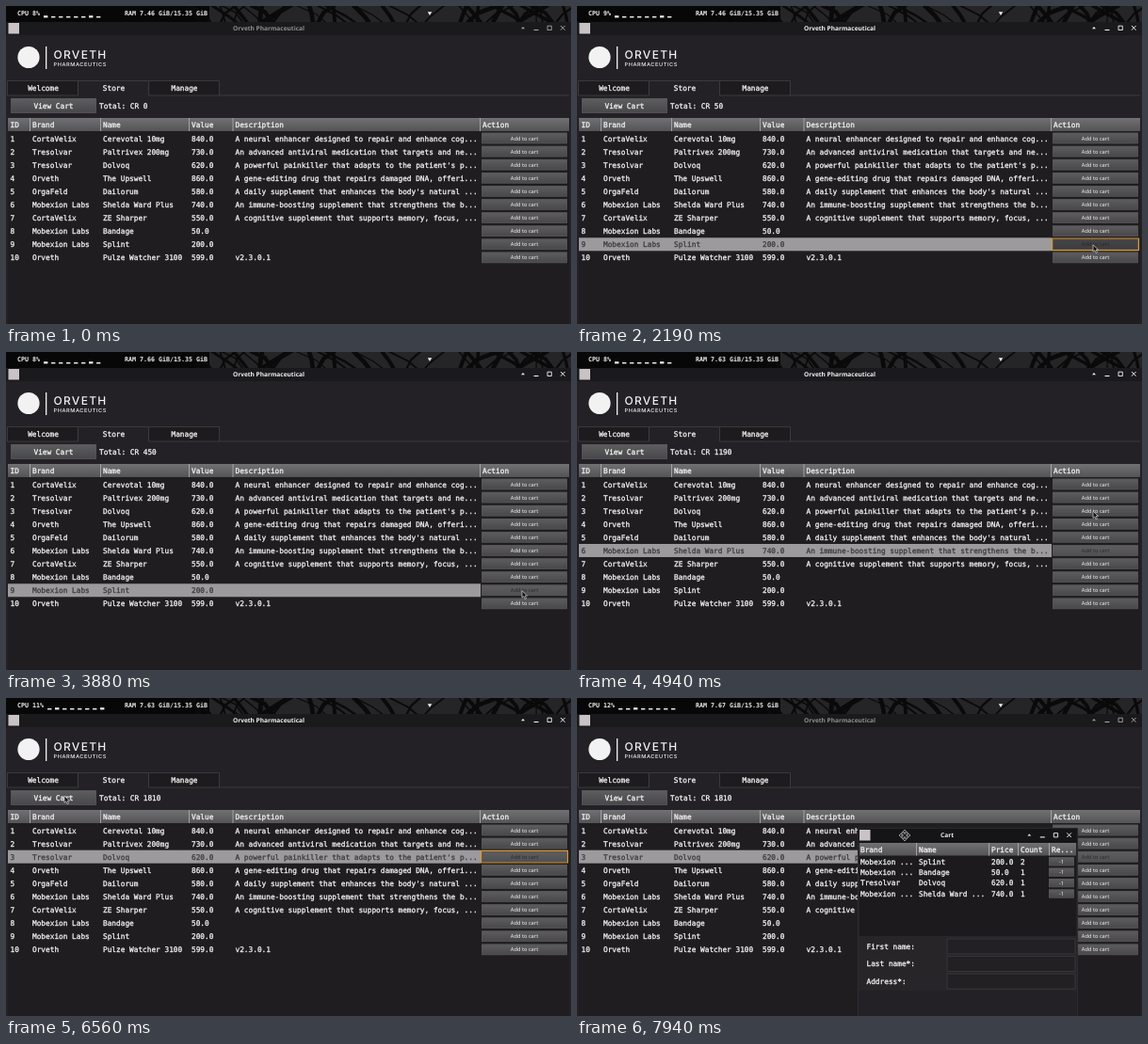
Recreate the animation shown at these times as an HTML page with a canvas. Size 600x338 px, loop 8 s.

```html
<!DOCTYPE html>
<html lang="en">
<head>
<meta charset="utf-8">
<title>Store</title>
<style>
html, body { margin: 0; width: 100%; height: 100%; overflow: hidden; background: #000; }
canvas { display: block; width: 600px; height: 338px; }
</style>
</head>
<body>
<canvas id="stage"></canvas>
<script>
const LOOP = 8000, STEP = 62.5;
const cv = document.getElementById('stage');
const ratio = window.devicePixelRatio || 1;
cv.width = 600 * ratio;
cv.height = 338 * ratio;
const g = cv.getContext('2d');
g.scale(ratio, ratio);
g.textRendering = 'geometricPrecision';
g.lineJoin = 'round';

const MONO = '7.78px "DejaVu Sans Mono", monospace';
const SMALL = '5.7px "Noto Sans", sans-serif';
const BOLD = 'bold 6.55px "Noto Sans", sans-serif';
const STATUS = 'bold 6.65px "DejaVu Sans Mono", monospace';
const BG = '#232125', DARK = '#1f1d20', LIGHT = '#f2f2f2', DIM = '#3d3c3d';

const products = [
  ['CortaVelix', 'Cerevotal 10mg', '840.0', 'A neural enhancer designed to repair and enhance cog...'],
  ['Tresolvar', 'Paltrivex 200mg', '730.0', 'An advanced antiviral medication that targets and ne...'],
  ['Tresolvar', 'Dolvoq', '620.0', "A powerful painkiller that adapts to the patient's p..."],
  ['Orveth', 'The Upswell', '860.0', 'A gene-editing drug that repairs damaged DNA, offeri...'],
  ['OrgaFeld', 'Dailorum', '580.0', "A daily supplement that enhances the body's natural ..."],
  ['Mobexion Labs', 'Shelda Ward Plus', '740.0', 'An immune-boosting supplement that strengthens the b...'],
  ['CortaVelix', 'ZE Sharper', '550.0', 'A cognitive supplement that supports memory, focus, ...'],
  ['Mobexion Labs', 'Bandage', '50.0', ''],
  ['Mobexion Labs', 'Splint', '200.0', ''],
  ['Orveth', 'Pulze Watcher 3100', '599.0', 'v2.3.0.1']
];

const PRESS = 250, GLIDE = 340, OPEN = 6687, GRAB = 7597;
const rowTop = row => 133.5 + (row - 1) * 14.1;
const price = row => +products[row - 1][2];

// ring: how long the button keeps its focus ring
const clicks = [
  { at: 1250, row: 8, ring: 500 },
  { at: 2125, row: 9, ring: 375 },
  { at: 2812, row: 9, ring: 1060 },
  { at: 4500, row: 6, ring: 312 },
  { at: 5125, row: 3, ring: OPEN - 5125 }
];
const moves = [
  ...clicks.map(c => ({ end: c.at - 187, x: 548, y: rowTop(c.row) + 7.5 })),
  { end: 6161, x: 62, y: 104, glide: 536 },
  { end: 6937, x: 277, y: 175 },
  { end: GRAB - 7, x: 384, y: 181 },
  { end: GRAB + GLIDE, x: 348, y: 146 }
];

function rect(x, y, w, h, fill) {
  g.fillStyle = fill;
  g.fillRect(x, y, w, h);
}
function frame(x, y, w, h, color, width = 1) {
  g.strokeStyle = color;
  g.lineWidth = width;
  g.strokeRect(x, y, w, h);
}
function shade(x, y, w, h, top, bottom) {
  const grad = g.createLinearGradient(0, y, 0, y + h);
  grad.addColorStop(0, top);
  grad.addColorStop(1, bottom);
  rect(x, y, w, h, grad);
}
function line(color, width, ...pts) {
  g.strokeStyle = color;
  g.lineWidth = width;
  g.beginPath();
  for (let i = 0; i < pts.length; i += 2) g.lineTo(pts[i], pts[i + 1]);
  g.stroke();
}
function shape(fill, ...pts) {
  g.fillStyle = fill;
  g.beginPath();
  for (let i = 0; i < pts.length; i += 2) g.lineTo(pts[i], pts[i + 1]);
  g.closePath();
  g.fill();
}
// y is the vertical middle of the capitals
function text(s, x, y, font = MONO, color = LIGHT, align = 'left') {
  const base = y + parseFloat(font.match(/[\d.]+px/)[0]) * 0.36;
  g.font = font;
  g.fillStyle = g.strokeStyle = color;
  g.textAlign = align;
  g.fillText(s, x, base);
  if (font === MONO) {
    // medium weight
    g.lineWidth = 0.3;
    g.strokeText(s, x, base);
  }
}
function button(x, y, w, h, label, font, state) {
  const [top, bottom, ink] = {
    up: ['#5e5d5f', '#474648', LIGHT],
    dim: ['#5e5d5f', '#504f51', '#2c2b2d'],
    down: ['#454446', '#3d3c3e', '#29282a']
  }[state];
  shade(x, y, w, h, top, bottom);
  frame(x + 0.5, y + 0.5, w - 1, h - 1, '#565557', 0.7);
  text(label, x + w / 2, y + h / 2, font, ink, 'center');
}
function tableHead(x, y, w, h, cols, labels) {
  shade(x, y, w, h, '#717072', '#545355');
  labels.forEach((label, i) => {
    text(label, cols[i], y + h / 2 + 0.3);
    if (i) line('#a3a2a4', 1, cols[i] - 2.5, y, cols[i] - 2.5, y + h);
  });
}
function windowButtons(x, y, color) {
  shape(color, x - 2, y + 0.9, x, y - 1.2, x + 2, y + 0.9);
  line(color, 1.1, x + 11.5, y + 2.2, x + 16.5, y + 2.2);
  frame(x + 26, y - 2.1, 4.3, 4.3, color, 0.9);
  line(color, 1, x + 40, y - 2.3, x + 44.6, y + 2.3);
  line(color, 1, x + 44.6, y - 2.3, x + 40, y + 2.3);
}

function seeded(seed) {
  return () => (seed = seed * 16807 % 2147483647) / 2147483647;
}
function wallpaper() {
  const rnd = seeded(41);
  rect(0, 0, 600, 17, '#070707');
  rect(216, 0, 384, 17, '#252426');
  for (let i = 0; i < 44; i++) {
    const x = 205 + rnd() * 400, lean = (rnd() - 0.5) * 70;
    line('#0a0a0a', 1 + rnd() * 4, x, 18, x + lean / 3, 6 + rnd() * 6, x + lean, -1);
  }
}

function statusBar(t) {
  wallpaper();
  const tick = Math.floor((t + 440) / 1000);
  const cpu = [8, 10, 9, 9, 8, 8, 9, 11, 12][tick];
  const label = 'CPU ' + cpu + '%';
  text(label, 12, 8, STATUS);
  for (let i = 0; i < 8; i++) {
    const h = (i * 5 + (cpu >> 1)) % 6 === 4 ? 2.2 : 1.4;
    rect(16 + label.length * 4 + i * 8, 12.4 - h, 4.4, h, LIGHT);
  }
  const ram = tick < 3 ? '7.46' : tick < 5 ? '7.66' : tick < 8 ? '7.63' : '7.67';
  text('RAM ' + ram + ' GiB/15.35 GiB', 126, 8, STATUS);
  shape(LIGHT, 447.8, 6.3, 452.2, 6.3, 450, 10);
}

function mainWindow(t) {
  const active = t >= clicks[0].at && t < OPEN;
  rect(0, 17, 600, 321, BG);
  rect(0, 17, 600, 14, '#1a191c');
  rect(2.5, 18, 11.5, 11.5, '#c9c3c6');
  text('Orveth Pharmaceutical', 279, 23.6, BOLD, active ? LIGHT : '#8f8e90', 'center');
  windowButtons(549, 23.3, active ? LIGHT : '#a5a4a6');

  g.fillStyle = LIGHT;
  g.beginPath();
  g.arc(24, 54.5, 11.6, 0, 7);
  g.fill();
  rect(42, 43, 1.3, 24, LIGHT);
  g.letterSpacing = '1.3px';
  text('ORVETH', 50.5, 51.2, '500 12px Inter, sans-serif');
  g.letterSpacing = '0.6px';
  text('PHARMACEUTICS', 50.5, 61.6, '500 5.6px Inter, sans-serif');
  g.letterSpacing = '0px';

  ['Welcome', 'Store', 'Manage'].forEach((label, i) => {
    const x = 1.5 + i * 75, chosen = i === 1;
    if (!chosen) rect(x, 79, 75, 16, '#1d1b1e');
    line('#414043', 0.8, x, 95, x, 79.5, x + 75, 79.5, x + 75, 95);
    if (!chosen) line('#414043', 0.8, x, 95, x + 75, 95);
    text(label, x + 38, 87, MONO, LIGHT, 'center');
  });
  line('#414043', 0.8, 226, 95, 598, 95);

  const pressed = t >= OPEN - 375 && t < OPEN - 125;
  button(5, 98, 91, 16, 'View Cart', MONO, pressed ? 'down' : 'up');
  const total = clicks.filter(c => t >= c.at + PRESS).reduce((sum, c) => sum + price(c.row), 0);
  text('Total: CR ' + total, 99, 106);
  productTable(t);
}

function productTable(t) {
  const cols = [4.5, 28, 103, 197, 243.5, 506];
  const last = clicks.filter(c => t >= c.at).pop();
  rect(2, 119, 596, 219, DARK);
  tableHead(2, 119, 596, 14, cols, ['ID', 'Brand', 'Name', 'Value', 'Description', 'Action']);
  products.forEach((row, i) => {
    const y = rowTop(i + 1), chosen = last && last.row === i + 1;
    if (chosen) rect(2, y, 502, 14, '#9c9a9c');
    [String(i + 1), ...row].forEach((s, k) => text(s, cols[k], y + 7.2, MONO, chosen ? DIM : LIGHT));
    const state = !chosen ? 'up' : t < last.at + PRESS ? 'down' : 'dim';
    button(505, y + 1.2, 91, 11.6, 'Add to cart', SMALL, state);
    if (chosen && t < last.at + last.ring) frame(504.5, y + 0.7, 92, 12.6, '#d99a2c', 1.2);
  });
}

function cartWindow(x, y) {
  g.save();
  g.translate(x, y);
  rect(0, 0, 234, 345, BG);
  rect(0, 0, 234, 16, '#151417');
  rect(2, 2, 11.5, 11.5, '#c9c3c6');
  text('Cart', 95, 7.7, BOLD, LIGHT, 'center');
  windowButtons(182.3, 7.7, LIGHT);

  const cols = [3, 65, 142, 173, 206];
  rect(2, 16, 230, 99, '#1c1a1d');
  tableHead(2, 16, 230, 13.5, cols, ['Brand', 'Name', 'Price', 'Count', 'Re...']);
  [9, 8, 3, 6].forEach((row, i) => {
    const mid = 35.8 + i * 11.4;
    const [brand, name, cost] = products[row - 1];
    const amount = clicks.filter(c => c.row === row).length;
    const cells = [brand.replace('Labs', '...'), name.replace('Plus', '...'), cost, amount];
    cells.forEach((s, k) => text(s, cols[k], mid));
    button(203, mid - 4.6, 27, 9.2, '-1', SMALL, 'up');
  });

  rect(1, 115, 232, 58, '#272528');
  ['First name:', 'Last name*:', 'Address*:'].forEach((s, i) => {
    const top = 118 + i * 18.6;
    text(s, 9.5, top + 8);
    rect(95, top, 136, 16, '#222023');
    frame(95, top, 136, 16, '#3d3c3f', 0.8);
  });
  frame(0.4, 0.4, 233.2, 345, '#323134', 0.8);
  g.restore();
}

function pointerAt(t) {
  let x = 572, y = 262;
  for (const m of moves) {
    const glide = m.glide || GLIDE;
    const u = Math.min(1, Math.max(0, (t - m.end + glide) / glide));
    const e = u * u * (3 - 2 * u);
    x += (m.x - x) * e;
    y += (m.y - y) * e;
  }
  return [x, y];
}
function pointer(x, y, moving) {
  g.save();
  g.translate(x, y);
  if (moving) {
    for (let i = 0; i < 4; i++) {
      shape('#151417', 0, -6, 2.6, -3, -2.6, -3);
      line('#d4d4d4', 0.7, 0, -1, 0, -3, -2.6, -3, 0, -6, 2.6, -3, 0, -3);
      g.rotate(Math.PI / 2);
    }
  } else {
    const tip = [0, 0, 0, 7.4, 1.8, 5.8, 3.1, 8.7, 4.5, 8, 3.2, 5.3, 5.5, 5.2];
    shape('#121113', ...tip);
    line('#dcdcdc', 0.7, ...tip, 0, 0);
  }
  g.restore();
}

function draw(now) {
  const t = Math.floor((now % LOOP + 2.5) / STEP) * STEP;
  const [x, y] = pointerAt(t);
  const drag = t >= GRAB;
  statusBar(t);
  mainWindow(t);
  if (t >= OPEN) cartWindow(334 + (drag ? x - 384 : 0), 173 + (drag ? y - 181 : 0));
  if (t >= 187) pointer(x, y, drag);
}

let start = null;
function loop(now) {
  if (start === null) start = now;
  draw(now - start);
  requestAnimationFrame(loop);
}
draw(0);
requestAnimationFrame(loop);
</script>
</body>
</html>
```
